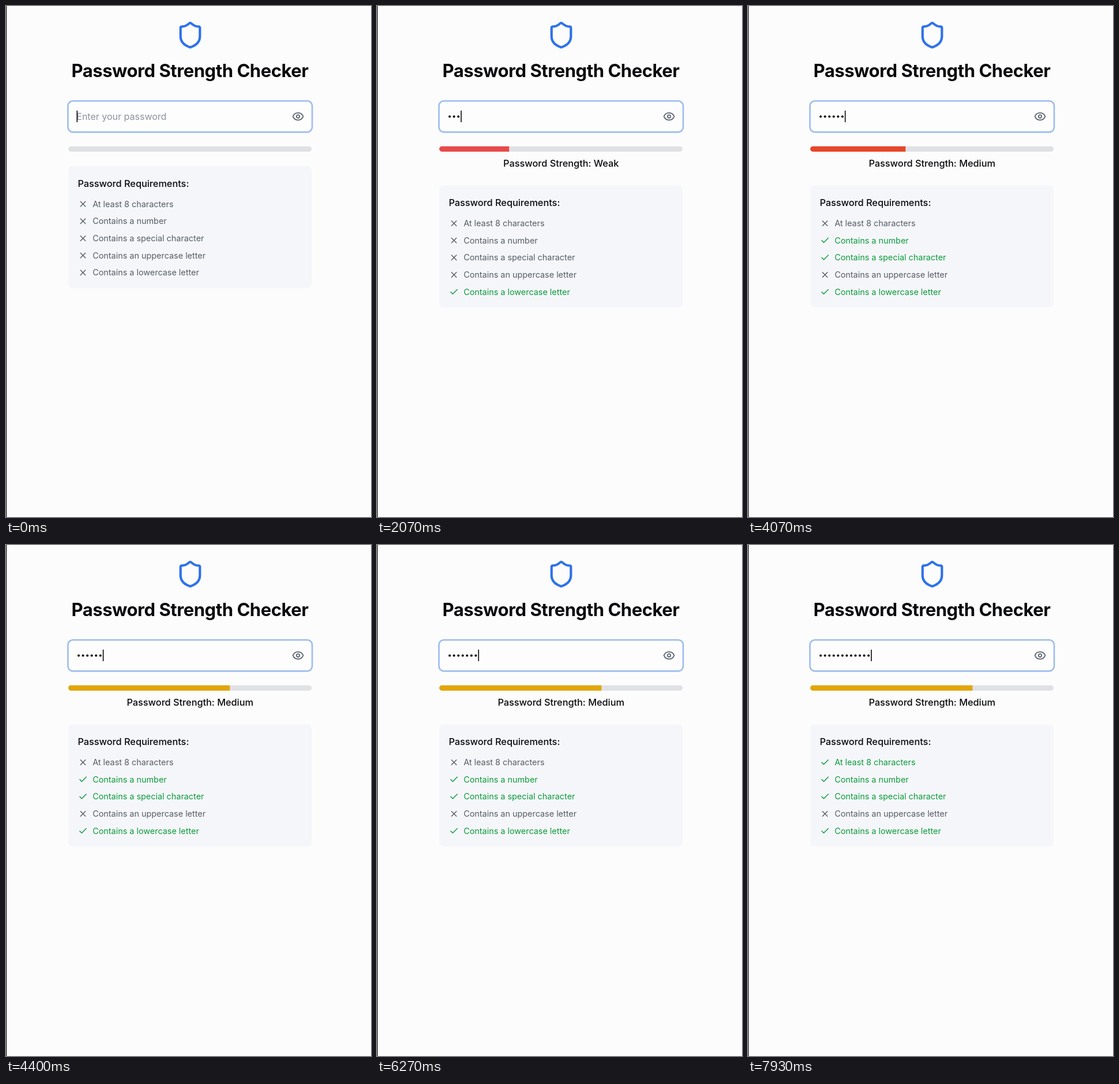
Animation of 633x884 px, one loop 8 s. Source, as an HTML page:

```html
<!DOCTYPE html>
<html lang="en">
<head>
<meta charset="utf-8">
<title>Password Strength Checker</title>
<style>
  html, body { margin: 0; width: 100%; height: 100%; overflow: hidden; background: #fcfcfc; }
  svg { display: block; width: 633px; height: 884px; }
  text { font-family: Inter, "Open Sans", sans-serif; font-optical-sizing: none; fill: #08090c; }
  .title { font-size: 31px; font-weight: 700; letter-spacing: -0.45px; text-anchor: middle; }
  .strong { font-size: 16.3px; font-weight: 530; }
  .hint { font-size: 16px; fill: #8d929d; }
  .row text { font-size: 14.4px; font-weight: 440; fill: #565c66; }
  .row.met text { fill: #0a9b3a; }
  .row path { stroke: #565c66; }
  .row.met path { stroke: #0a9b3a; }
  .icon { fill: none; stroke-width: 2; stroke-linecap: round; stroke-linejoin: round; }
</style>
</head>
<body>
<svg viewBox="0 0 633 884">
  <defs>
    <clipPath id="track"><rect x="108" y="242.7" width="422" height="9.2" rx="4.6"/></clipPath>
    <filter id="shadow" x="-50%" y="-50%" width="200%" height="200%">
      <feDropShadow dx="0" dy="1" stdDeviation="1" flood-opacity=".35"/>
    </filter>
  </defs>
  <rect width="633" height="884" fill="#fcfcfc"/>
  <rect width="1.2" height="884" fill="#1a1a1a"/>

  <path class="icon" stroke="#2f72ea" transform="translate(294.3 25.2) scale(2.1)"
    d="M20 13c0 5-3.5 7.5-7.66 8.95a1 1 0 0 1-.67-.01C7.5 20.5 4 18 4 13V6a1 1 0 0 1 1-1c2 0 4.5-1.2 6.24-2.72a1.17 1.17 0 0 1 1.52 0C14.51 3.81 17 5 19 5a1 1 0 0 1 1 1z"/>
  <text class="title" x="319" y="123">Password Strength Checker</text>

  <rect x="107.4" y="164.3" width="423.6" height="53.8" rx="8.5" fill="#fdfdfd" stroke="#9cbcf0" stroke-width="2.6"/>
  <text id="hint" class="hint" x="122.3" y="196.5">Enter your password</text>
  <g id="dots" fill="#08090c"></g>
  <rect id="caret" y="181" width="1.6" height="20" fill="#08090c"/>
  <g class="icon" stroke="#5b6470" transform="translate(495.9 180.5) scale(.883)">
    <path d="M2.06 12.35a1 1 0 0 1 0-.7 10.75 10.75 0 0 1 19.88 0 1 1 0 0 1 0 .7 10.75 10.75 0 0 1-19.88 0"/>
    <circle cx="12" cy="12" r="3"/>
  </g>

  <g clip-path="url(#track)">
    <rect x="108" y="242" width="422" height="11" fill="#e0e1e5"/>
    <rect id="bar" x="108" y="242" width="0" height="11"/>
  </g>
  <text id="verdict" class="strong" x="319.2" y="278" text-anchor="middle"></text>

  <g id="panel">
    <rect x="108" y="277" width="422" height="211" rx="7.5" fill="#f5f6fa"/>
    <text class="strong" x="124.4" y="312.6">Password Requirements:</text>
  </g>

  <path id="pointer" d="M0 0V17.5L4 13.8L6.6 20L9.6 18.7L7 12.7H12.3Z" filter="url(#shadow)"
    fill="#000" stroke="#fff" stroke-width="1.4" stroke-linejoin="round" paint-order="stroke"/>
</svg>

<script>
const LOOP = 8000;
const BAR_MS = 500;
const BAR_WIDTH = 422;
const DOT_STEP = 7.55;
const CROSS = "M18 6 6 18M6 6l12 12";
const TICK = "M20 6 9 17l-5-5";

const keyTimes = [1780, 1900, 2020, 2560, 2700, 3960, 6150, 6450, 6750, 7050, 7350, 7650];
const requirements = [
  ["At least 8 characters", keyTimes[7]],
  ["Contains a number", keyTimes[3]],
  ["Contains a special character", keyTimes[5]],
  ["Contains an uppercase letter", Infinity],
  ["Contains a lowercase letter", keyTimes[0]],
];
const levels = [
  { at: 0, label: "", part: 0, color: [224, 225, 229] },
  { at: keyTimes[0], label: "Weak", part: 1 / 3, color: [232, 50, 48] },
  { at: keyTimes[5], label: "Medium", part: 2 / 3, color: [226, 166, 10] },
];
const pointerMove = { start: 270, end: 530, from: [562, 672], to: [331, 508] };

const $ = id => document.getElementById(id);
const [hint, dots, caret, bar, verdict, panel, pointer] =
  ["hint", "dots", "caret", "bar", "verdict", "panel", "pointer"].map($);

function add(parent, tag, attrs) {
  const node = document.createElementNS("http://www.w3.org/2000/svg", tag);
  for (const name in attrs) node.setAttribute(name, attrs[name]);
  return parent.appendChild(node);
}

const dotNodes = keyTimes.map((_, i) =>
  add(dots, "circle", { cx: 126 + i * DOT_STEP, cy: 191.2, r: 2 }));

const rows = requirements.map(([label, metAt], i) => {
  const y = 342.5 + i * 29.7;
  const group = add(panel, "g", { class: "row" });
  const icon = add(group, "path", {
    class: "icon", transform: `translate(125 ${y - 8.5}) scale(.708)`,
  });
  add(group, "text", { x: 150.2, y: y + 5 }).textContent = label;
  return { group, icon, metAt };
});

const clamp = v => Math.min(1, Math.max(0, v));
const mix = (a, b, k) => a + (b - a) * k;

// cubic-bezier(.4, 0, .2, 1)
function ease(x) {
  let low = 0, high = 1;
  for (let i = 0; i < 20; i++) {
    const u = (low + high) / 2;
    const at = 1.2 * u * (1 - u) ** 2 + 0.6 * u * u * (1 - u) + u ** 3;
    if (at < x) low = u; else high = u;
  }
  return low * low * (3 - 2 * low);
}

const show = (node, on) => node.setAttribute("visibility", on ? "visible" : "hidden");

function drawInput(t) {
  const count = keyTimes.filter(k => k <= t).length;
  const blinkStart = count ? keyTimes[count - 1] : -100;
  show(hint, !count);
  dotNodes.forEach((dot, i) => show(dot, i < count));
  show(caret, (t - blinkStart) % 1000 < 500);
  caret.setAttribute("x", 122.5 + count * DOT_STEP);
}

function drawStrength(t) {
  const index = levels.filter(l => l.at <= t).length - 1;
  const level = levels[index];
  const before = levels[Math.max(0, index - 1)];
  const k = ease(clamp((t - level.at) / BAR_MS));
  bar.setAttribute("width", BAR_WIDTH * mix(before.part, level.part, k));
  bar.setAttribute("fill", `rgb(${level.color.map((c, i) => Math.round(mix(before.color[i], c, k)))})`);
  verdict.textContent = level.label && `Password Strength: ${level.label}`;
  panel.setAttribute("transform", `translate(0 ${index ? 33.4 : 0})`);
}

function drawRows(t) {
  for (const { group, icon, metAt } of rows) {
    const met = t >= metAt;
    group.classList.toggle("met", met);
    icon.setAttribute("d", met ? TICK : CROSS);
  }
}

function drawPointer(t) {
  const { start, end, from, to } = pointerMove;
  const k = 1 - (1 - clamp((t - start) / (end - start))) ** 2;
  show(pointer, t >= start && t < keyTimes[0]);
  pointer.setAttribute("transform", `translate(${from.map((v, i) => mix(v, to[i], k))})`);
}

const origin = performance.now();
function frame() {
  const t = (performance.now() - origin) % LOOP;
  drawInput(t);
  drawStrength(t);
  drawRows(t);
  drawPointer(t);
  requestAnimationFrame(frame);
}
frame();
</script>
</body>
</html>
```
